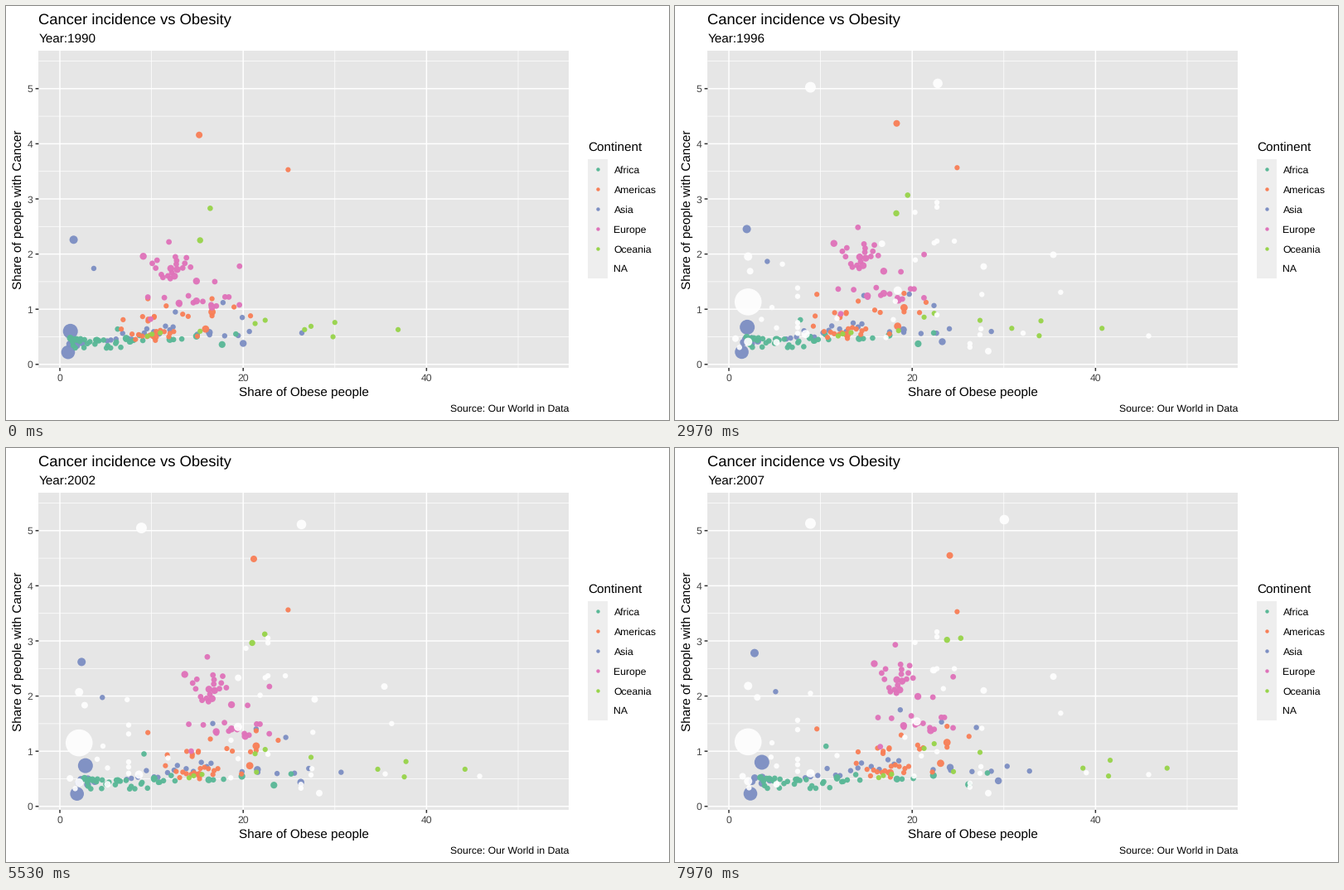
Animation of 800 by 500 pixels, one loop 8 s. Source, as a matplotlib script:

```python
import numpy as np
import matplotlib.pyplot as plt
from matplotlib.animation import FuncAnimation
from matplotlib.patches import Rectangle

plt.rcParams["font.family"] = "Liberation Sans"
plt.rcParams["text.hinting"] = "none"

FRAMES = 240
LOOP_MS = 8000
YEARS_PER_FRAME = 27 / 370

GREEN, ORANGE, BLUE = "#5ab897", "#f87f57", "#7d8fc3"
PINK, LIME, WHITE = "#df73ba", "#98d44b", "#ffffff"
LEFT, RIGHT, TOP, BOTTOM = 39.4, 679, 54, 437

rng = np.random.default_rng(4)
u = np.arange(FRAMES) / (FRAMES - 1)
ease = u * (0.9 + 0.1 * u)


def px(x):
    return 65 + 11.06 * np.asarray(x)


def py(y):
    return 432.8 - 66.6 * np.asarray(y)


def area(radius):
    return (2 * radius * 0.72) ** 2


def cloud(n, x0, x1, y0, y1, skew=1, tilt=0):
    """Scattered points; skew crowds them to the left, tilt lifts the right."""
    q = np.linspace(0, 1, n)
    x = x0 + (x1 - x0) * q ** skew + rng.uniform(-0.2, 0.2, n)
    y = rng.uniform(y0, y1, n) + tilt * q
    return list(zip(x, y))


class Swarm:
    """Paths of many dots, drawn as one scatter."""

    def __init__(self):
        self.paths, self.colors, self.sizes = [], [], []

    def path(self, color, radius, start, end, bow=0):
        x = start[0] + (end[0] - start[0]) * ease
        y = start[1] + (end[1] - start[1]) * u + bow * np.sin(np.pi * u)
        self.paths.append(np.column_stack([px(x), py(y)]))
        self.colors.append(color)
        self.sizes.append(area(radius))

    def group(self, color, radius, points, shift, slope, growth):
        """Every dot moves right by shift + slope * x and up by a factor."""
        for x, y in points:
            end = (x + shift + slope * x, y * growth)
            self.path(color, radius, (x, y), end)

    def draw(self, ax, alpha, zorder):
        self.paths = np.stack(self.paths, axis=1)
        self.dots = ax.scatter(*self.paths[0].T, s=self.sizes, c=self.colors,
                               alpha=alpha, linewidths=0, zorder=zorder)


def continents():
    s = Swarm()
    s.path(BLUE, 9, (1.15, .60), (3.6, .80))
    s.path(BLUE, 8.3, (.9, .22), (2.35, .23))
    s.path(BLUE, 5, (1.5, 2.26), (2.8, 2.78))
    s.path(BLUE, 3.2, (3.7, 1.74), (5.1, 2.08))

    asia = dict(shift=1, slope=.42, growth=1.22)
    s.group(BLUE, 4.2, cloud(5, .9, 2.4, .32, .45), **asia)
    s.group(BLUE, 3.2, cloud(14, 5, 12.5, .33, .52, tilt=.22), **asia)
    s.group(BLUE, 3.2, cloud(5, 15, 20.8, .5, .6), **asia)
    s.group(BLUE, 4.2, [(16.3, .58), (20, .38)], **asia)
    s.path(BLUE, 3.2, (12.6, .95), (18.7, 1.75))
    s.path(BLUE, 3.2, (17.8, 1.12), (23.2, 1.53))
    s.path(BLUE, 3.2, (19.9, .85), (27, 1.43))
    s.path(BLUE, 3.2, (26.4, .57), (32.8, .64))

    africa = dict(shift=1.9, slope=.37, growth=1.1)
    s.group(GREEN, 3.3, cloud(26, 1.3, 9, .28, .54, skew=1.3), **africa)
    s.group(GREEN, 4.1, cloud(4, 1.3, 7.3, .4, .5, skew=2), **africa)
    s.group(GREEN, 3.3, [(12.4, .45), (13.3, .46), (19.2, .55)], **africa)
    s.group(GREEN, 4.1, [(12, .45), (14.9, .51), (17.7, .36)], **africa)
    s.path(GREEN, 3.3, (6.3, .64), (10.6, 1.09))

    americas = dict(shift=7.2, slope=0, growth=1.22)
    s.group(ORANGE, 3.1, cloud(14, 8, 12.4, .38, .58, tilt=.06), **americas)
    s.group(ORANGE, 3.1, cloud(5, 9.2, 10.4, .76, .87), **americas)
    s.group(ORANGE, 3.1, [(6.9, .81), (6.7, .64), (11.6, 1.06), (13.4, .91),
                          (14, .87), (15, .51), (16.6, 1.19), (16.6, .88),
                          (19, 1.04)], **americas)
    s.group(ORANGE, 4.4, [(10.4, .5), (16.6, .95), (15.9, .64)], **americas)
    s.group(ORANGE, 3.1, [(9.6, 1.19), (20.8, .88)], 0, 0, 1.18)
    s.path(ORANGE, 4, (15.2, 4.16), (24.1, 4.55), bow=.07)
    s.path(ORANGE, 3.1, (24.9, 3.53), (24.9, 3.53), bow=.04)

    europe = dict(shift=8.4, slope=-.18, growth=1.32)
    s.group(PINK, 3.4, cloud(14, 10, 14.2, 1.4, 1.95), **europe)
    s.group(PINK, 3.4, cloud(9, 13.2, 19.4, 1.05, 1.28), **europe)
    s.group(PINK, 3.4, [(11.9, 2.22), (12.6, 1.95), (16.9, 1.5), (19.6, 1.78),
                        (9.6, 1.22), (11.4, 1.21), (9.9, .82)], **europe)
    s.group(PINK, 4.2, [(9.1, 1.96), (12.1, 1.74), (12.8, 1.72), (12.5, 1.6),
                        (14.9, 1.51), (13, 1.11), (14.9, 1.15), (16.6, 1.04)],
            **europe)

    s.group(LIME, 3.1, cloud(3, 9.5, 10.8, .5, .58), 6.8, 0, 1.02)
    s.group(LIME, 3.1, [(15.3, .6)], 9.2, 0, 1.05)
    s.group(LIME, 3.1, [(21.3, .74), (22.4, .8), (27.4, .69)], 0, 0, 1.42)
    s.group(LIME, 3.1, [(26.7, .63), (30, .76), (29.8, .5), (36.9, .63)],
            14.6, -.1, 1.1)
    s.path(LIME, 3.7, (15.3, 2.25), (23.8, 3.02), bow=.22)
    s.path(LIME, 3.3, (16.4, 2.83), (25.3, 3.05), bow=.17)
    return s


def ungrouped():
    s = Swarm()
    s.path(WHITE, 16.3, (2.1, 1.11), (2.1, 1.17))
    s.path(WHITE, 6.5, (8.9, 5.08), (8.9, 5.13), bow=-.08)
    s.path(WHITE, 5.8, (18.9, 5.18), (30.05, 5.2), bow=-.1)
    s.group(WHITE, 3.2, [(22.7, 2.8), (22.7, 2.72), (20.3, 2.63)], 0, 0, 1.13)
    s.group(WHITE, 3.2, [(22.4, 2.05), (22.7, 2.08), (24.6, 2.08), (27.6, 1.18),
                         (4.7, .96), (45.8, .48)], 0, 0, 1.2)
    s.group(WHITE, 3.2, [(7.5, y) for y in (.52, .62, .7, 1.14, 1.28)], 0, 0, 1.22)
    s.group(WHITE, 3.2, [(27.5, .6), (27.4, .5), (26.3, .35), (26.3, .29)],
            0, 0, 1.2)
    s.group(WHITE, 4, [(35.4, 1.77), (27.8, 1.58)], 0, 0, 1.33)
    s.group(WHITE, 3.2, [(18.7, 1.75), (4.2, 1.68), (16.3, .75), (15.5, .45)],
            4.7, 0, 1.22)
    s.group(WHITE, 3.2, [(11.8, .78), (5.2, .62), (22.7, .84)], 0, 0, 1.18)
    s.group(WHITE, 3.2, [(3, .77), (.6, .29), (17.6, 1.08)], 1.6, 0, 1.16)
    s.group(WHITE, 4, [(.3, .42), (1.9, 1.52)], 1.2, 0, 1.3)
    s.group(WHITE, 4, [(5.2, .4), (28.3, .24)], 0, 0, 1)
    s.group(WHITE, 5, [(2.1, 1.82), (2.1, .38)], 0, 0, 1.2)
    s.path(WHITE, 5, (8.1, .52), (8.9, .6))
    s.path(WHITE, 5, (17.3, 1.22), (20.5, 1.54))
    s.path(WHITE, 4, (13.7, 2.02), (22.3, 2.47))
    s.path(WHITE, 3.2, (28.4, .54), (39, .61))
    s.path(WHITE, 3.2, (36.2, 1.08), (36.2, 1.69))
    return s


fig = plt.figure(figsize=(8, 5), dpi=100, facecolor="white")
ax = fig.add_axes([0, 0, 1, 1])
ax.set_xlim(0, 800)
ax.set_ylim(500, 0)
ax.axis("off")


def box(x, y, w, h, color):
    ax.add_patch(Rectangle((x, y), w, h, fc=color, ec="none", zorder=0))


def line(xs, ys, color, width):
    ax.plot(xs, ys, color=color, lw=width, snap=False, zorder=1,
            solid_capstyle="butt")


def label(x, y, text, size, color="black", **kw):
    return ax.text(x, y, text, fontsize=size, color=color, va="baseline", **kw)


box(LEFT, TOP, RIGHT - LEFT, BOTTOM - TOP, "#e6e6e6")
for x in (10, 30, 50):
    line([px(x)] * 2, [TOP, BOTTOM], "white", 0.53)
for y in np.arange(0.5, 6):
    line([LEFT, RIGHT], [py(y)] * 2, "white", 0.53)
for x in (0, 20, 40):
    line([px(x)] * 2, [TOP, BOTTOM], "white", 1.07)
    line([px(x)] * 2, [BOTTOM, BOTTOM + 3.8], "#2f2f2f", 1.07)
    label(px(x), 453.3, str(x), 8.8, "#444444", ha="center")
for y in range(6):
    line([LEFT, RIGHT], [py(y)] * 2, "white", 1.07)
    line([LEFT - 3.8, LEFT], [py(y)] * 2, "#2f2f2f", 1.07)
    label(32.2, py(y) + 4.5, str(y), 8.8, "#444444", ha="right")

label(39.4, 21, "Cancer incidence vs Obesity", 13.2)
year_text = label(39.4, 44, "Year:1990", 11)
label(359.3, 471, "Share of Obese people", 11, ha="center")
label(18.5, 246, "Share of people with Cancer", 11, ha="center",
      rotation=90, rotation_mode="anchor")
label(679, 490, "Source: Our World in Data", 8.8, ha="right")

label(702, 176, "Continent", 11)
box(702, 185, 24, 144, "#eeeeee")
LEGEND = [("Africa", GREEN), ("Americas", ORANGE), ("Asia", BLUE),
          ("Europe", PINK), ("Oceania", LIME), ("NA", None)]
for i, (name, color) in enumerate(LEGEND):
    y = 197 + 24 * i
    if color:
        ax.scatter([714], [y], s=area(2.2), c=color, linewidths=0)
    label(733.5, y + 4.4, name, 8.8)

colored, blank = continents(), ungrouped()
colored.draw(ax, alpha=0.96, zorder=3)
blank.draw(ax, alpha=0.9, zorder=4)


def update(frame):
    year_text.set_text(f"Year:{int(1990 + frame * YEARS_PER_FRAME)}")
    for swarm in (colored, blank):
        swarm.dots.set_offsets(swarm.paths[frame])
    # Countries without a continent are missing only at the very start
    blank.dots.set_visible(frame > 0)
    return colored.dots, blank.dots, year_text


anim = FuncAnimation(fig, update, frames=FRAMES, interval=LOOP_MS / FRAMES,
                     repeat=True, repeat_delay=0)
plt.show()
```
